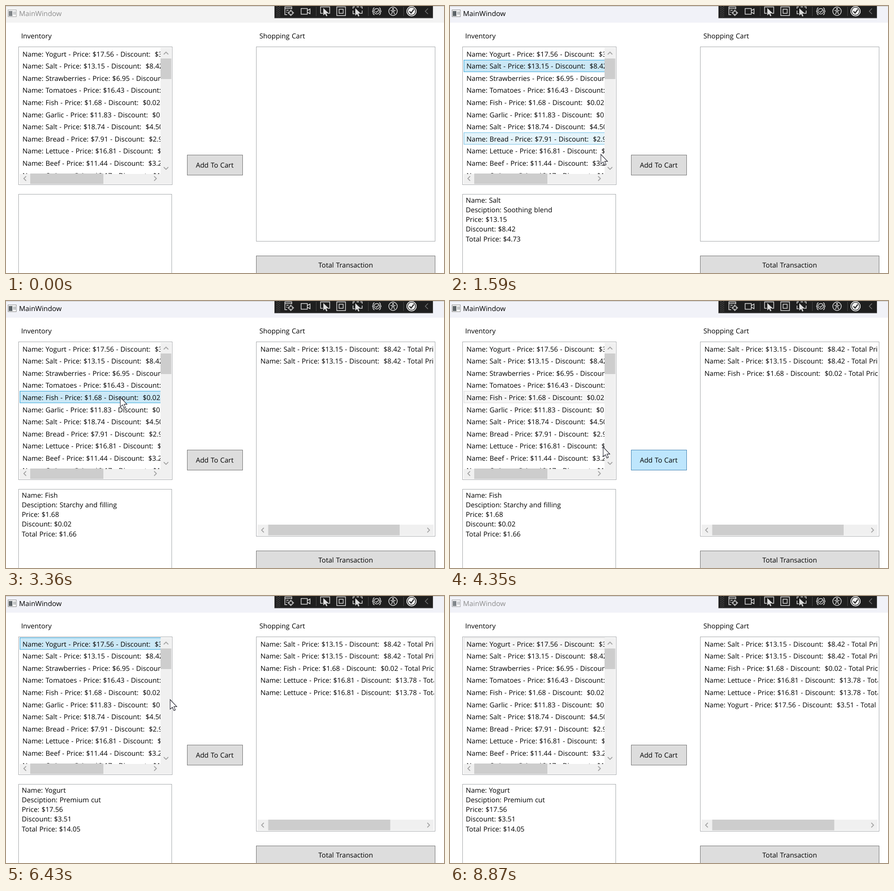
Animation of 958 by 585 pixels, one loop 8.95 s. Source, as an HTML page:

```html
<!DOCTYPE html>
<html lang="en">
<head>
<meta charset="utf-8">
<title>MainWindow</title>
<style>
  html, body { margin: 0; width: 100%; height: 100%; overflow: hidden; background: #fff; }
  svg { display: block; }
  text { font: 15px "Open Sans", "Noto Sans", sans-serif; word-spacing: .7px; fill: #000; text-rendering: geometricPrecision; }
  #title { font-size: 15.3px; }
  .mid { text-anchor: middle; }
  .box { fill: #fff; stroke: #a4a7aa; }
  .button { fill: #ddd; stroke: #707070; }
  .button.hover { fill: #bee6fd; stroke: #3c7fb1; }
  .button.pressed { fill: #c4e5f6; stroke: #2c628b; }
  .box.hover { stroke: #7eb4ea; }
  .row { fill: none; stroke: none; }
  .row.hover { fill: #26a0da1f; stroke: #26a0daa8; }
  .row.idle { fill: #dadada3d; stroke: #dadada; }
  .row.active { fill: #26a0da3d; stroke: #26a0da; }
  .track { fill: #f0f0f0; }
  .thumb { fill: #cdcdcd; }
  .chevron { fill: none; stroke: #a3a3a3; stroke-width: 1.8; }
  .tools { fill: none; stroke: #dcdcdc; stroke-width: 1.5; }
  .tools .solid { fill: #dcdcdc; stroke: none; }
  .tools .rule { stroke: #4a4a4a; stroke-width: 1; }
</style>
</head>
<body>
<svg width="958" height="585" viewBox="0 0 958 585">
  <defs>
    <clipPath id="listClip"><path d="M30 90H339V368H30Z"/></clipPath>
    <clipPath id="cartClip"><path d="M550 90H936V490H550Z"/></clipPath>
    <path id="arrow" d="M0 0V16L4 12.4 6.6 18 9 17 6.6 11.4H12Z"/>
  </defs>

  <rect id="titleBar" width="958" height="36.5"/>
  <path d="M0 .5H958" stroke="#c4c4c4"/>
  <g id="icon">
    <rect x="4.5" y="8.5" width="18" height="15" fill="#f8f8f8" stroke="#8c8c8c"/>
    <path d="M6 11H14V22H6Z" fill="#5d6468"/>
    <path d="M16 12H18V19H16ZM19 12H21V19H19Z" fill="#a9adb0"/>
  </g>
  <text id="title" x="28.5" y="22">MainWindow</text>

  <g class="tools">
    <path d="M587 0H934V26.5H587Z" fill="#1f1f1f" stroke="none"/>
    <path d="M587.5 0V26H933.5V0" stroke="#4a4a4a" stroke-width="1"/>
    <path d="M592.5 1V24M598.5 1V24" stroke="#666" stroke-dasharray="1.5 2.5"/>
    <path d="M595.5 3V24" stroke="#666" stroke-dasharray="1.5 2.5"/>
    <path d="M615 19H610V2H625V7M610 5.5H625M613 9.5H618M613 13.5H615"/>
    <circle cx="623" cy="15" r="4.6"/>
    <path d="M623 8V13M623 17V22M616 15H621M625 15H630"/>
    <path d="M645.5 5.5H659V18H645.5ZM659 10L665 6.5V17L659 13.5"/>
    <path class="rule" d="M678.5 2V22M792.5 2V22M869.5 2V22"/>
    <path d="M693 16H688V2H708V16H704"/>
    <use href="#arrow" x="694" y="4.5" class="solid"/>
    <path d="M723.5 2H742.5V21H723.5ZM728.5 7H737.5V16H728.5Z"/>
    <path d="M759 6V2H763M767 2H772M775 2H779V6M759 10V14M759 14V17H763M779 10V16H775"/>
    <use href="#arrow" x="764" y="5" class="solid"/>
    <path d="M806 4Q803 4 803 8Q803 11 801 11.5Q803 12 803 15Q803 19 806 19M816 4Q819 4 819 8Q819 11 821 11.5Q819 12 819 15Q819 19 816 19"/>
    <circle cx="811" cy="11.5" r="6"/>
    <path d="M808 11.5L810.5 14 815 9"/>
    <circle cx="846.5" cy="11.5" r="9.3"/>
    <circle class="solid" cx="846.5" cy="6.5" r="1.9"/>
    <path d="M841 9.5L845 10.5H848L852 9.5M845 10.5V13.5L843 18M848 10.5V13.5L850 18"/>
    <circle cx="887" cy="11.5" r="10.3" stroke="#fff"/>
    <circle cx="887" cy="11.5" r="8" fill="#f2f2f2" stroke="none"/>
    <path d="M882.5 11.5L886 15.5 892 7.5" stroke="#1f1f1f" stroke-width="2.2"/>
    <path d="M923 5.5L917 11.5 923 17.5" stroke="#777"/>
  </g>

  <text x="33.2" y="71">Inventory</text>
  <text x="554.2" y="71">Shopping Cart</text>

  <rect class="box" x="27.5" y="89.5" width="336" height="302"/>
  <g id="list" clip-path="url(#listClip)"></g>
  <path class="track" d="M338 91.5H361.5V390H30V368H338Z"/>
  <path class="thumb" d="M338 115H361.5V160H338ZM53 367H213V390H53Z"/>
  <path class="chevron" d="M345 106L350 101 355 106M345 353L350 358 355 353M44 373L39 378 44 383M324 373L329 378 324 383"/>

  <rect id="detailBox" class="box" x="27.5" y="412.5" width="335" height="190"/>
  <g id="detail"></g>

  <rect class="box" x="547.5" y="89.5" width="391" height="426"/>
  <g id="cart" clip-path="url(#cartClip)"></g>
  <g id="cartBar">
    <path class="track" d="M550 490H935.5V513.5H550Z"/>
    <rect id="cartThumb" class="thumb" x="573.5" y="490" height="23.5"/>
    <path class="chevron" d="M564 497L559 502 564 507M921.5 497L926.5 502 921.5 507"/>
  </g>

  <rect id="addButton" x="396.5" y="326.5" width="121" height="44"/>
  <text class="mid" x="456.5" y="354">Add To Cart</text>
  <rect id="totalButton" x="547.5" y="547.5" width="391" height="50"/>
  <text class="mid" x="743" y="573">Total Transaction</text>

  <path id="cursor" d="M0 0V21L5 16.6 8.2 24 11.4 22.6 8.3 15.4H14.6Z" fill="#fff" stroke="#1c1c28" stroke-width="1.1"/>
</svg>
<script>
const LOOP = 8950, TICK = 76.3, ROW = 26.6, TOP = 91;
const $ = id => document.getElementById(id);

const items = [
  ['Yogurt', 17.56, 3.51, 'Premium cut'],
  ['Salt', 13.15, 8.42, 'Soothing blend'],
  ['Strawberries', 6.95, 2.14],
  ['Tomatoes', 16.43, 5.27],
  ['Fish', 1.68, .02, 'Starchy and filling'],
  ['Garlic', 11.83, .64],
  ['Salt', 18.74, 4.50],
  ['Bread', 7.91, 2.93],
  ['Lettuce', 16.81, 13.78, 'Ripe and juicy'],
  ['Beef', 11.44, 3.26],
  ['Onions', 3.17, 1.08]
];
const YOGURT = 0, SALT = 1, FISH = 4, LETTUCE = 8;

// [time, item, time at which the list loses focus]
const selections = [[1220, SALT, 2440], [3360, FISH, 4120], [4580, LETTUCE, 5270], [6130, YOGURT, 6820]];
// [press, release, item]
const purchases = [
  [2440, 2590, SALT], [2740, 2820, SALT], [4120, 4280, FISH],
  [5270, 5420, LETTUCE], [5500, 5570, LETTUCE], [6820, 6970, YOGURT]
];
// [tick, x, y] of the pointer
const route = [
  [8, 412, 560], [14, 205, 131], [16, 215, 132], [17, 220, 140], [20, 308, 290], [21, 330, 325],
  [26, 505, 364], [27, 497, 367], [28, 497, 367], [29, 484, 348], [37, 484, 348],
  [42, 250, 211], [45, 250, 211], [52, 452, 359], [55, 452, 359], [56, 450, 346], [57, 335, 320],
  [59, 300, 316], [61, 300, 316], [67, 408, 341], [73, 408, 341], [76, 280, 104], [80, 280, 104],
  [88, 438, 350], [94, 438, 350], [96, 440, 372], [97, 443, 372], [102, 600, 580]
];

const money = n => '$' + n.toFixed(2);
const describe = ([name, price, off]) =>
  `Name: ${name} - Price: ${money(price)} - Discount:\u00a0 ${money(off)} - Total Price: ${money(price - off)}`;

function add(parent, tag, attrs, content = '') {
  const node = document.createElementNS('http://www.w3.org/2000/svg', tag);
  for (const key in attrs) node.setAttribute(key, attrs[key]);
  node.textContent = content;
  return parent.appendChild(node);
}
// Baselines sit on whole pixels so that the text stays crisp.
const line = (parent, x, i, content) => add(parent, 'text', { x, y: Math.round(110.5 + ROW * i), }, content);

const rows = items.map((item, i) => {
  const row = add($('list'), 'rect', { x: 30.5, y: Math.round(TOP + ROW * i) + .5, width: 500, height: 25.6 });
  line($('list'), 36, i, describe(item));
  return row;
});
const cartLines = purchases.map(([, , item], i) => line($('cart'), 556.5, i, describe(items[item])));
const detailLines = [0, 1, 2, 3, 4].map(i => add($('detail'), 'text', { x: 34.6, y: Math.round(430.5 + 21.3 * i) }));

function pointer(tick) {
  const next = route.findIndex(p => p[0] >= tick);
  if (tick < route[0][0] || next < 0) return null;
  const [t1, x1, y1] = route[next], [t0, x0, y0] = route[Math.max(next - 1, 0)];
  const k = t1 > t0 ? (tick - t0) / (t1 - t0) : 1;
  return [x0 + (x1 - x0) * k, y0 + (y1 - y0) * k];
}
const inside = (p, x0, y0, x1, y1) => p && p[0] >= x0 && p[0] <= x1 && p[1] >= y0 && p[1] <= y1;
const show = (node, on) => node.setAttribute('visibility', on ? 'visible' : 'hidden');
const style = (node, ...names) => node.setAttribute('class', names.filter(Boolean).join(' '));

function draw(t) {
  const tick = Math.floor((t + 15) / TICK);
  const at = pointer(tick);
  const over = pointer(tick - 1); // hover effects trail the pointer

  show($('cursor'), at);
  if (at) $('cursor').setAttribute('transform', `translate(${at.map(Math.round)})`);

  const focused = t >= 1220 && t < 8870;
  $('titleBar').style.fill = t < 1220 ? '#f3f3f3' : '#f1f2f8';
  $('title').style.fill = focused ? '#000' : '#8c8c8c';
  $('icon').style.opacity = focused ? 1 : .75;

  const chosen = selections.filter(s => t >= s[0]).pop();
  const hovered = inside(over, 30, TOP, 338, 366) ? Math.floor((over[1] - TOP) / ROW) : -1;
  rows.forEach((row, i) => {
    const state = chosen && chosen[1] === i ? (t < chosen[2] ? 'active' : 'idle') : i === hovered && 'hover';
    style(row, 'row', state);
  });

  let info = [];
  if (chosen) {
    const [name, price, off, about] = items[chosen[1]];
    info = ['Name: ' + name, 'Desciption: ' + about, 'Price: ' + money(price),
      'Discount: ' + money(off), 'Total Price: ' + money(price - off)];
  }
  detailLines.forEach((node, i) => node.textContent = info[i] || '');

  purchases.forEach((p, i) => show(cartLines[i], t >= p[1]));
  show($('cartBar'), t >= purchases[0][1]);
  $('cartThumb').setAttribute('width', t < purchases[3][1] ? 287.5 : 267);

  const pressed = purchases.some(p => t >= p[0] && t < p[1]);
  style($('addButton'), 'button', pressed ? 'pressed' : inside(over, 396, 326, 518, 371) && 'hover');
  style($('totalButton'), 'button', inside(over, 547, 547, 939, 600) && 'hover');
  style($('detailBox'), 'box', inside(over, 27, 412, 363, 600) && 'hover');
}

const start = performance.now();
function frame() {
  draw((performance.now() - start) % LOOP);
  requestAnimationFrame(frame);
}
frame();
</script>
</body>
</html>
```
